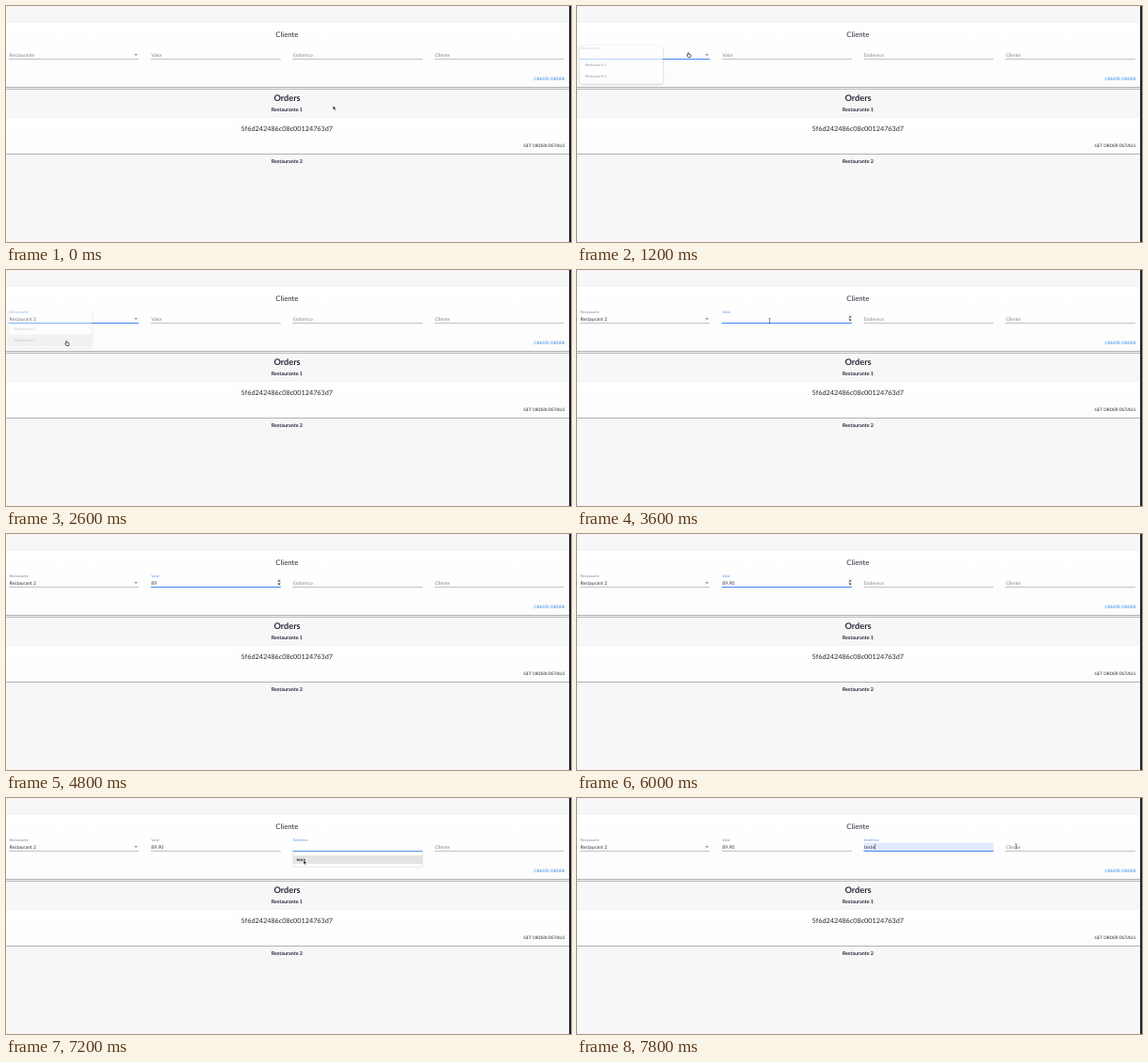
Write an HTML page that moves like this. It is 600 by 251 pixels and loops after 8000 ms.

```html
<!DOCTYPE html>
<html lang="pt">
<head>
<meta charset="utf-8">
<style>
html, body { margin: 0; width: 100%; height: 100%; overflow: hidden; background: #f8f7f8; }
svg { display: block; width: 600px; height: 251px; }
text { font-family: Lato, "Open Sans", sans-serif; font-size: 5.1px; fill: #3a3d46; text-rendering: geometricPrecision; white-space: pre; }
.mid { text-anchor: middle; fill: #252a38; }
.end { text-anchor: end; }
.bold { font-weight: 700; }
</style>
</head>
<body>
<svg viewBox="0 0 600 251">
  <defs>
    <linearGradient id="card" x2="0" y2="1"><stop stop-color="#fff"/><stop offset="1" stop-color="#fcfcfc"/></linearGradient>
    <filter id="shadow" x="-20%" y="-20%" width="140%" height="160%"><feDropShadow dx="0" dy="1" stdDeviation="1.6" flood-opacity=".35"/></filter>
  </defs>
  <rect width="600" height="251" fill="#f8f7f8"/>
  <rect y="17.5" width="598" height="68.5" fill="url(#card)"/>
  <rect y="17" width="598" height=".6" fill="#eeeeef"/>
  <rect y="86" width="598" height="1" fill="#b2b2b4"/>
  <rect y="87" width="598" height="1" fill="#eeeef0"/>
  <rect y="88" width="598" height="1" fill="#bcbcbe"/>
  <rect y="118.5" width="598" height="38.5" fill="url(#card)"/>
  <rect y="118" width="598" height=".6" fill="#eeeeef"/>
  <rect y="157" width="598" height="1" fill="#b2b2b4"/>
  <rect x="598" width="2" height="251" fill="#1d2434"/>
  <text class="mid" x="298.3" y="33.2" style="font-size:7.7px">Cliente</text>
  <text class="mid bold" x="298.5" y="100.7" style="font-size:9.2px">Orders</text>
  <text class="mid bold" x="298.3" y="111.5" style="font-size:5.4px">Restaurante 1</text>
  <text class="mid" x="298.3" y="132.8" style="font-size:7.25px">5f6d242486c08c00124763d7</text>
  <text class="mid bold" x="298.3" y="166.6" style="font-size:5.4px">Restaurante 2</text>
  <text class="end" x="593.4" y="79.4" style="font-size:4.5px;fill:#2f80ed">CREATE ORDER</text>
  <text class="end" x="593.4" y="150.1" style="font-size:4.55px;fill:#252a38">GET ORDER DETAILS</text>
  <g id="live"></g>
</svg>
<script>
const LOOP = 8000, STEP = 200, BLUE = '#4489ee';
const live = document.getElementById('live');

// [time, x, y, shape]
const mouse = [
  [0, 347.3, 106, 'arrow'], [200, 338, 103, 'arrow'], [400, 270, 84, 'arrow'],
  [600, 186, 60, 'arrow'], [800, 132, 52, 'hand'], [1000, 119, 52, 'hand'],
  [1600, 113, 55, 'hand'], [1800, 90, 65, 'hand'], [2000, 72, 75, 'hand'], [2200, 65, 78, 'hand'],
  [2800, 72, 80, 'arrow'], [3000, 118, 72, 'arrow'], [3200, 174, 58, 'arrow'], [3400, 204.5, 54, 'beam'],
  [4200, 0, 0, ''], [6200, 220, 54, 'beam'], [6400, 284, 53, 'arrow'], [6600, 316, 53, 'beam'],
  [7200, 316, 66, 'arrow'], [7400, 322, 66, 'arrow'], [7600, 410, 55, 'beam'], [7800, 466.3, 51.3, 'beam']
];
const cursors = {
  arrow: '<path d="M0 0V4.6L1.1 3.6 1.9 5.4 2.7 5 1.9 3.3H3.4Z" fill="#111" stroke="#fff" stroke-width=".4"/>',
  hand: '<path d="M-1.3 -2.2Q-.8 -2.9-.3 -2.2V-.8L1.7 -.3Q2.2 0 2 1L1.5 2.6H-.9L-2.2 .4Q-2 -.3-1.3 .3Z" fill="#fff" stroke="#222" stroke-width=".7"/>',
  beam: '<path d="M-1 -2.5Q0 -2.5 0 -1.8Q0 -2.5 1 -2.5M0 -1.8V1.8M-1 2.5Q0 2.5 0 1.8Q0 2.5 1 2.5" fill="none" stroke="#333" stroke-width=".55"/>'
};

const rect = (x, y, w, h, fill, more = '') =>
  `<rect x="${x}" y="${y}" width="${w}" height="${h}" fill="${fill}" ${more}/>`;
const text = (x, y, s, size, fill, cls = '') =>
  `<text x="${x}" y="${y}" class="${cls}" style="font-size:${size}px;fill:${fill}">${s}</text>`;
const tri = (x, y, w, h, fill = '#777') => `<path d="M${x - w} ${y}h${2 * w}l${-w} ${h}z" fill="${fill}"/>`;

function field(x, label, value, active) {
  const small = active || value;
  return text(x, small ? 46 : 53.7, label, small ? 3.85 : 5.1, active ? '#5a93e6' : '#85878d') +
    text(x, 53.6, value, 5.1, '#33363f') +
    rect(x - .5, 56, 138, active ? 1 : .8, active ? BLUE : '#b4b4b8');
}

function menu(opacity, hover) {
  const item = (i, y) => (hover === i ? rect(3, y - 7.5, 88, 12.4, '#dfdfe1') : '') +
    text(8.4, y, 'Restaurant ' + i, 4.2, '#666');
  return `<g opacity="${opacity}">` + rect(3, 42.3, 88, 40, '#fff', 'rx="1.2" filter="url(#shadow)"') +
    item(1, 63.6) + item(2, 76.2) + '</g>';
}

function suggestion(hover) {
  return rect(304.7, 57.2, 137.8, 16, '#fff', 'stroke="#d6d6da" stroke-width=".6" rx=".6"') +
    (hover ? rect(305, 61, 137.2, 9, '#e4e4e6') : '') +
    text(308.5, 67, 'teste', 4.2, '#222', 'bold');
}

function draw(t) {
  const [, mx, my, shape] = mouse.findLast(m => m[0] <= t);
  const focus = t < 1200 ? -1 : t < 3600 ? 0 : t < 6800 ? 1 : 2;
  const amount = t < 4400 ? '' : t < 4800 ? '8' : t < 5400 ? '89' : '89.90';
  const filled = t >= 7400;
  let out = filled ? rect(304.4, 47.6, 138, 8.4, '#e1eafb') : '';
  out += field(3.5, 'Restaurante', t < 2400 ? '' : 'Restaurant 2', focus === 0) +
    field(154.3, 'Valor', amount, focus === 1) +
    field(304.9, 'Endereco', filled ? 'teste' : '', focus === 2) +
    field(455.4, 'Cliente', '', false) + tri(138, 51.2, 1.7, 1.8);
  if (focus === 1) {
    out += rect(288, 47.5, 4, 8, '#eeeef0') + tri(290, 50.6, 1.4, -1.9, '#333') + tri(290, 52.6, 1.4, 1.9, '#333');
  }
  if (t >= 1200 && t < 2800) {
    const hover = t < 1800 ? 0 : t < 2000 ? 1 : 2;
    out += menu(t < 1400 ? .62 : t < 2600 ? 1 : .35, hover);
  }
  if (t >= 7000 && t < 7400) out += suggestion(t >= 7200);
  if (filled) out += rect(316.3, 48.8, .6, 6, '#333');
  if (shape) out += `<g transform="translate(${mx} ${my})">${cursors[shape]}</g>`;
  live.innerHTML = out;
}

let last = -1;
function tick() {
  const t = Math.floor(performance.now() % LOOP / STEP) * STEP;
  if (t !== last) draw(last = t);
  requestAnimationFrame(tick);
}
tick();
</script>
</body>
</html>
```
